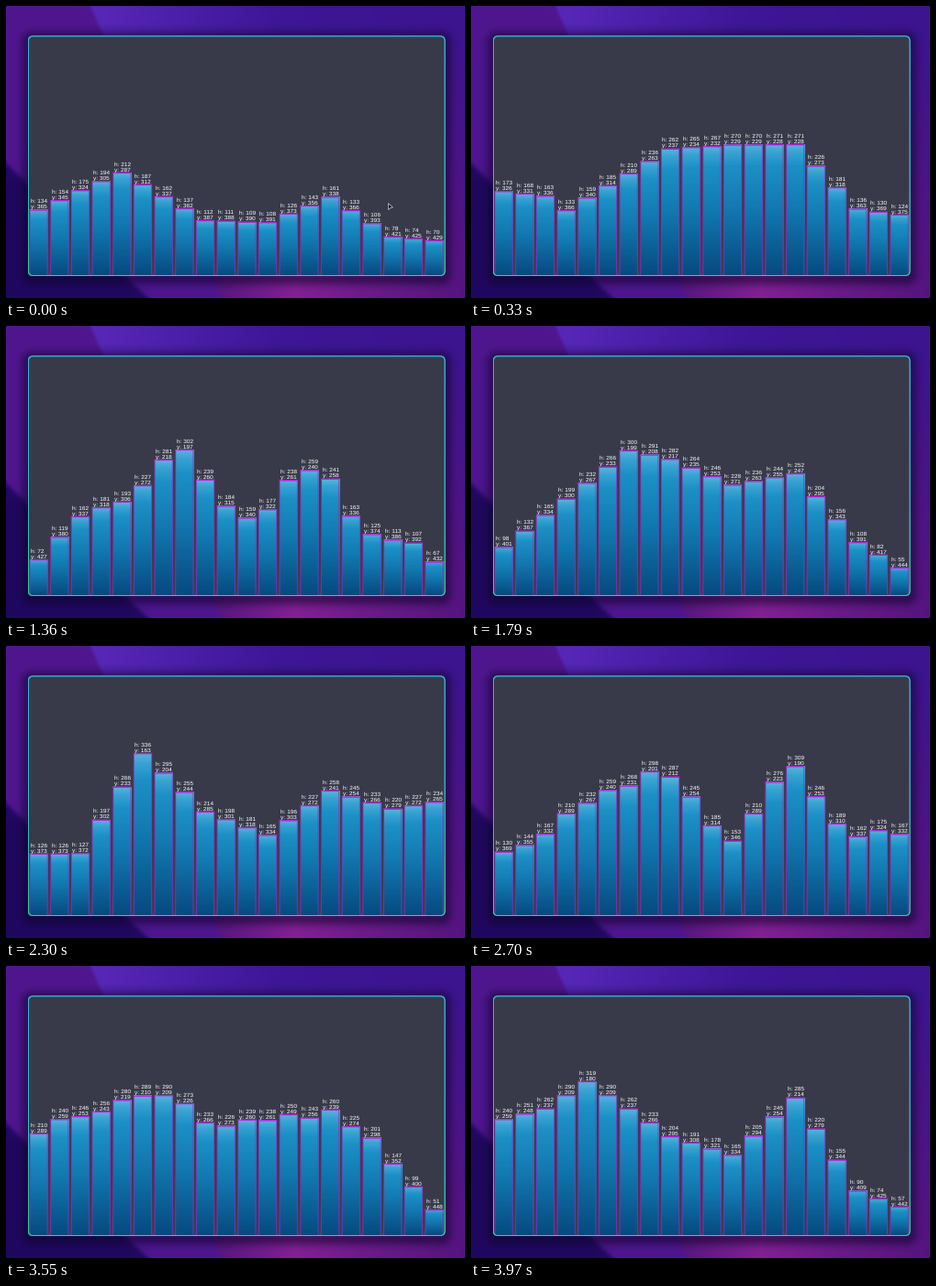
Animation of 500 by 319 pixels, one loop 4000 ms. Source, as a matplotlib script:

```python
import numpy as np
import matplotlib.pyplot as plt
from matplotlib.animation import FuncAnimation
from matplotlib.colors import to_rgb
from matplotlib.patches import FancyBboxPatch, Polygon

W, H, DPI = 500, 319, 100
FRAMES, INTERVAL = 125, 32
PX = 72 / DPI                      # points per pixel
BARS, PITCH, LEFT, BAR_W = 20, 22.68, 26.0, 19.2
TOP, SCALE, FULL = 32.4, 0.5225, 499
FLOOR = TOP + FULL * SCALE + 1
PANEL = (23.6, 32.2, 478.8, 295.2)

# Spectrum outline per key frame: the bar of the main bend, then the
# heights at bars 0, 2, bend, 8, 11, 14, 17 and 19.
POSES = {
    0: (4, 134, 175, 212, 112, 108, 161, 78, 70),
    10: (3, 173, 163, 133, 262, 270, 271, 136, 124),
    29: (7, 137, 185, 290, 214, 140, 224, 89, 42),
    55: (6, 98, 165, 300, 282, 228, 252, 108, 55),
    71: (5, 126, 127, 336, 214, 165, 258, 220, 234),
    96: (7, 173, 191, 287, 263, 203, 289, 121, 84),
    124: (4, 240, 262, 319, 204, 165, 285, 90, 57),
}
KEYS = list(POSES)
INDEX = np.arange(BARS)

rng = np.random.default_rng(4)
WAVES = [(rng.uniform(-0.22, 0.22), rng.uniform(0.05, 0.13),
          rng.uniform(0, 2 * np.pi)) for _ in range(5)]


def pose(key):
    bend, *values = POSES[key]
    return np.interp(INDEX, (0, 2, bend, 8, 11, 14, 17, 19), values)


def heights(frame):
    k = min(np.searchsorted(KEYS, frame, side="right") - 1, len(KEYS) - 2)
    a, b = KEYS[k], KEYS[k + 1]
    u = (frame - a) / (b - a)
    s = u * u * (3 - 2 * u)
    wave = sum(np.sin(2 * np.pi * (INDEX * f + frame * g) + p)
               for f, g, p in WAVES)
    swing = 15 * np.sin(np.pi * u) * min(1, (b - a) / 20)
    h = (1 - s) * pose(a) + s * pose(b) + swing * wave
    return np.clip(np.rint(h), 40, 355).astype(int)


def gradient(t, *stops):
    pos, colors = zip(*stops)
    rgb = np.array([to_rgb(c) for c in colors])
    return np.stack([np.interp(t, pos, rgb[:, c]) for c in range(3)], -1)


def tint(img, mask, color):
    mask = mask[..., None]
    return img * (1 - mask) + mask * np.array(to_rgb(color))


def soft(v, width=1.0):
    return 1 / (1 + np.exp(-np.clip(v / width, -40, 40)))


def wallpaper():
    y, x = np.mgrid[0:H, 0:W] + 0.5
    high = gradient(x / W, (0.2, "#5827b8"), (0.4, "#4a1ea6"),
                    (0.6, "#3e1696"), (1, "#3c148e"))
    low = gradient(x / W, (0.25, "#36106c"), (0.45, "#56167e"),
                   (0.63, "#842094"), (0.8, "#6c1a8a"), (1, "#541480"))
    blend = np.clip((y - 20) / 270, 0, 1)[..., None]
    img = high * (1 - blend) + low * blend
    img = tint(img, soft(92 + 0.45 * y - x), "#501690")
    img = tint(img, soft(y - 172 - 0.95 * x, 2), "#200860")

    # drop shadow of the panel
    x0, y0, x1, y1 = PANEL
    dx = np.maximum(np.maximum(x0 + 6 - x, x - x1 + 6), 0)
    dy = np.maximum(np.maximum(y0 + 8 - y, y - y1 + 3), 0)
    d = np.maximum(np.hypot(dx, dy) - 6, 0)
    return tint(img, 0.5 * np.exp(-(d / 8) ** 2), "#0c0428")


def rounded(inset, radius, **style):
    x0, y0, x1, y1 = PANEL
    box = FancyBboxPatch((x0 + inset, y0 + inset), x1 - x0 - 2 * inset,
                         y1 - y0 - 2 * inset, lw=0,
                         boxstyle=f"round,pad=0,rounding_size={radius}", **style)
    return ax.add_patch(box)


def picture(data, extent, z):
    return ax.imshow(data, extent=extent, aspect="auto", zorder=z,
                     interpolation="bilinear")


def stroke(color, width, z, **style):
    line, = ax.plot([], [], color=color, lw=width * PX, zorder=z, snap=False,
                    solid_capstyle="butt", **style)
    return line


plt.rcParams["text.hinting"] = "none"
plt.rcParams["font.family"] = "Liberation Sans"
fig = plt.figure(figsize=(W / DPI, H / DPI), dpi=DPI)
ax = fig.add_axes([0, 0, 1, 1])
ax.axis("off")
ax.imshow(wallpaper(), extent=(0, W, H, 0), aspect="auto",
          interpolation="nearest", zorder=0)
ax.set(xlim=(0, W), ylim=(H, 0))
ax.autoscale(False)

ramp = np.linspace(0, 1, 128)[:, None]
outer = rounded(0, 6, fc="none", zorder=1)
rim = picture(gradient(ramp, (0, "#35b4dc"), (0.6, "#30bcc8"), (1, "#35cfa2")),
              (PANEL[0], PANEL[2], PANEL[3], PANEL[1]), 1)
rim.set_clip_path(outer)
inner = rounded(1.4, 4.8, fc="#383a49", zorder=2)
fill = gradient(ramp, (0, "#58b4dc"), (0.06, "#38a2d2"), (0.16, "#1c90c6"),
                (0.5, "#1278b0"), (1, "#064a80"))


class Bar:
    def __init__(self, i):
        self.x = LEFT + i * PITCH
        self.glow = stroke("#6a2a9c", 3, 2.5, alpha=0.3)
        self.body = picture(fill, (self.x, self.x + BAR_W, FLOOR, TOP), 3)
        self.sides = stroke("#8a32b2", 1, 4, alpha=0.8)
        self.cap = stroke("#ac2cdc", 1.5, 5)
        for part in (self.glow, self.body, self.sides, self.cap):
            part.set_clip_path(inner)
        self.labels = [ax.text(self.x + 1, 0, "", color="white", zorder=6,
                               fontsize=6.5 * PX, va="baseline")
                       for _ in range(2)]

    def set(self, h):
        y = FULL - h
        top = TOP + y * SCALE
        a, b = self.x, self.x + BAR_W
        self.body.set_extent((a, b, FLOOR, top))
        for line in (self.glow, self.sides):
            line.set_data([a, a, np.nan, b, b],
                          [FLOOR, top, np.nan, top, FLOOR])
        self.cap.set_data([a - 0.5, b + 0.5], [top, top])
        for label, text, dy in zip(self.labels, (f"h: {h}", f"y: {y}"), (7.8, 2)):
            label.set_text(text)
            label.set_y(top - dy)


bars = [Bar(i) for i in range(BARS)]
arrow = np.array([(0, 0), (0.2, 7), (2, 5.2), (5, 4.4)])
cursor = ax.add_patch(Polygon(arrow + (416.4, 215.6), fc="#101014",
                              ec="#d8d8e0", lw=0.7 * PX, zorder=8))


def update(frame):
    for bar, h in zip(bars, heights(frame)):
        bar.set(h)
    cursor.set_visible(frame < 4)
    return []


anim = FuncAnimation(fig, update, frames=FRAMES, interval=INTERVAL,
                     repeat=True, repeat_delay=0, blit=False)
plt.show()
```
